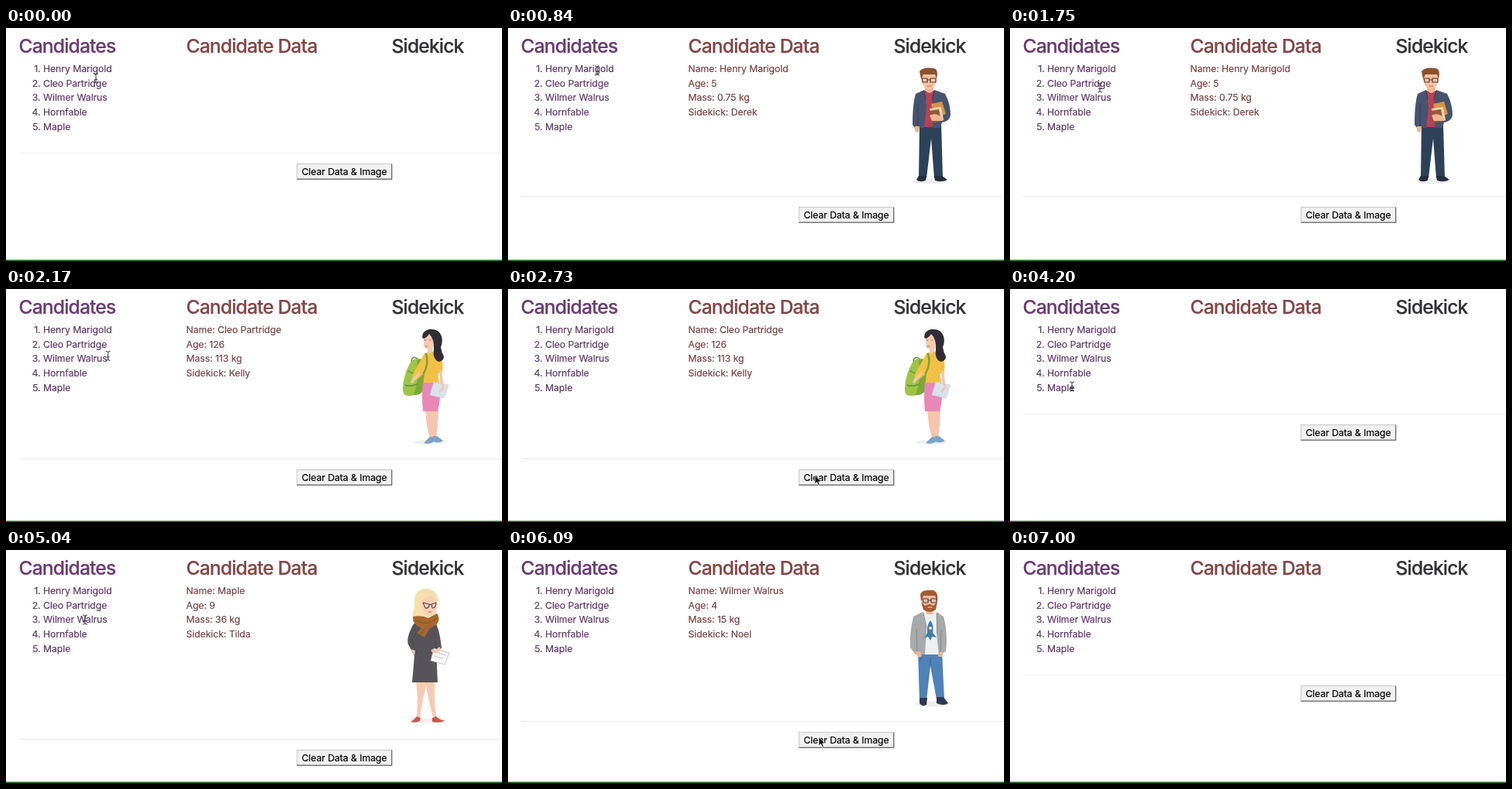
Write an HTML page that moves like this. It is 640 px wide and 301 px high and loops after 7.07 s.

```html
<!DOCTYPE html>
<html lang="en">
<head>
<meta charset="utf-8">
<title>Candidates</title>
<style>
html, body { margin: 0; width: 100%; height: 100%; overflow: hidden; background: #fff; }
svg { display: block; width: 640px; height: 301px; }
text { font: 12.25px Inter, Roboto, sans-serif; letter-spacing: -.07px; stroke: currentColor; stroke-width: .18px; }
.head { font-size: 24.6px; font-weight: 500; letter-spacing: -.83px; stroke-width: .25px; }
.purple { fill: #693c74; color: #693c74; }
.brown { fill: #824746; color: #824746; }
.dark { fill: #323236; color: #323236; }
#list { fill: #5f3669; color: #5f3669; }
#data { fill: #774241; color: #774241; }
.person, #arrow, #beam { display: none; }
.line { fill: none; stroke-linecap: round; stroke-linejoin: round; }
</style>
</head>
<body>
<svg viewBox="0 0 640 301">
  <text class="head purple" x="16.5" y="31.5">Candidates</text>
  <text class="head brown" x="232.5" y="31.5">Candidate Data</text>
  <text class="head dark" x="497.5" y="31.5">Sidekick</text>
  <g id="list"></g>
  <g id="data"></g>

  <g id="p0" class="person">
    <ellipse cx="546" cy="198" rx="22" ry="3.5" fill="#eee"/>
    <path fill="#2d4258" d="M531 124H559L561 194H550L546 143L540 194H530Z"/>
    <path fill="#26303e" d="M530 191H540L539 197Q531 200 527 196ZM550 191H560L567 196Q560 200 551 197Z"/>
    <path fill="#b94057" d="M536 82L543 79L551 82L553 128H533Z"/>
    <path fill="#f3b694" d="M539 73H549V80Q544 88 538 80Z"/>
    <path fill="#47546f" d="M537 80L526 85Q522 98 522 125L525 129H537L540 101ZM550 80L564 85Q571 98 571 113Q569 121 560 122L558 129H548L547 99Z"/>
    <path class="line" stroke="#303c53" stroke-width="1" d="M529 98V126M537 81L539 92M550 81L547 93"/>
    <path fill="#efb48f" d="M525 127H531L530 134Q526 136 525 132Z"/>
    <path fill="#d99544" d="M546 98L560 95L565 111L551 117Z"/>
    <path fill="#f2d9a6" d="M544 104L559 102L562 119L547 122Z"/>
    <path fill="#96583d" d="M543 107L556 105L559 120L546 123Z"/>
    <path fill="#f3b694" d="M544 113Q551 109 558 114L561 120L547 120Z"/>
    <path fill="#f8c29f" d="M533 59H553L552 71Q549 79 543 79Q536 79 534 70Z"/>
    <path fill="#8d512e" d="M533 66L531 56Q535 50 549 52Q556 53 553 66L551 60H536Z"/>
    <path class="line" stroke="#4d3b3a" stroke-width="1.2" d="M534 65H541V70H535ZM545 65H552V70H545ZM541 67H545"/>
    <path class="line" stroke="#b96b59" d="M541 75H546"/>
  </g>

  <g id="p1" class="person">
    <ellipse cx="546" cy="198" rx="20" ry="3" fill="#eef0f0"/>
    <path fill="#f5c5ad" d="M541 156H550L551 178L551 194H547L543 176ZM550 156H558L557 176L555 192H551Z"/>
    <path fill="#7ba4c4" d="M547 191L552 192L551 198Q545 201 539 199ZM551 190H556L564 196Q559 200 551 197Z"/>
    <path fill="#9dc444" d="M523 93Q530 87 540 92L541 120Q538 138 520 138Q511 138 512 128Q513 109 523 93Z"/>
    <path fill="#7ca83a" d="M530 92Q537 89 541 94L540 130Q534 138 526 137Q534 116 530 92Z"/>
    <path class="line" stroke="#648f35" stroke-width="1.4" d="M519 106Q526 111 533 109M515 124Q522 127 530 123M523 93Q524 86 531 90"/>
    <path fill="#f3c046" d="M540 83L549 80L559 84Q565 92 563 107L557 110L560 126H538L540 109L530 117L524 112L534 94Z"/>
    <path class="line" stroke="#78a43a" stroke-width="2.5" d="M542 84Q546 96 539 109"/>
    <path class="line" stroke="#f5c5ad" stroke-width="3.5" d="M527 114L524 120L533 109M561 107L562 121"/>
    <path fill="#e988b8" d="M538 121H560Q562 138 557 158H538Q536 138 538 121Z"/>
    <path fill="#f8cbb3" d="M539 60L546 56L552 62V73L549 82L544 84V77Q539 78 539 71Z"/>
    <path fill="#302e34" d="M537 63Q537 54 546 52Q559 51 562 61Q564 68 561 75Q562 82 565 87Q565 93 558 94Q550 90 552 78Q553 65 546 58Q543 63 539 64Z"/>
    <path class="line" stroke="#80625a" stroke-width=".8" d="M540 66H542M546 66H548M541 74H544"/>
    <path fill="#d8e2ea" stroke="#c5d2dc" stroke-width=".7" d="M552 120L571 124L565 141L547 137Z"/>
    <path class="line" stroke="#f5c5ad" stroke-width="3" d="M562 119L564 127L560 132"/>
  </g>

  <g id="p2" class="person">
    <ellipse cx="545" cy="221" rx="23" ry="3" fill="#f5f0ef"/>
    <path fill="#f6cbb3" d="M529 169H544L538 192L534 218H530L531 191ZM541 169H553V192L555 217H551L545 191Z"/>
    <path fill="#c9574a" d="M530 215L535 217L534 221Q528 224 522 222Q527 219 530 215ZM550 217L555 215Q560 220 566 220Q561 224 550 222Z"/>
    <path fill="#f7dfac" d="M527 62Q530 50 543 50Q555 51 558 64L555 81L560 92H526Q523 83 527 75Z"/>
    <path fill="#56535a" d="M530 91L551 90Q559 97 562 127L555 130L557 171H524L527 137L519 122Q516 114 525 97Z"/>
    <path class="line" stroke="#444249" stroke-width=".8" d="M529 107L524 118L530 133M552 106L555 127"/>
    <path fill="#f6cbb3" d="M523 128L528 130L527 137Z"/>
    <path fill="#f8d0b8" d="M537 62Q543 56 550 59Q557 66 555 76Q552 85 546 85Q538 82 537 73Z"/>
    <path fill="#f7dfac" d="M533 83Q532 70 539 62L550 58L556 66Q557 53 543 51Q529 53 528 80Z"/>
    <path class="line" stroke="#6d3c3c" stroke-width="1.1" d="M538 68L546 70Q546 76 541 75ZM549 70L555 68Q555 75 550 75ZM546 71L549 70"/>
    <path class="line" stroke="#c26459" d="M545 80H549"/>
    <path fill="#a8672f" d="M525 86Q537 84 545 88L556 82Q561 88 556 96L546 102L540 113L530 107L536 101Q524 96 525 86Z"/>
    <path class="line" stroke="#87501f" d="M529 91Q542 99 555 89M540 102L535 109"/>
    <path fill="#f7f7f4" stroke="#b9b5b4" stroke-width=".8" d="M552 127L572 133L566 148L548 143Z"/>
    <path class="line" stroke="#b9b5b4" stroke-width=".8" d="M555 132L567 136M553 137L564 140"/>
    <path class="line" stroke="#f4c7ac" stroke-width="3" d="M559 127L555 132L550 130"/>
  </g>

  <g id="p3" class="person">
    <ellipse cx="547" cy="199" rx="22" ry="3.5" fill="#eee"/>
    <path fill="#4f82b7" d="M529 132H560L563 193H553L545 150L540 194H531Z"/>
    <path class="line" stroke="#366593" d="M545 139V149M534 139L531 143M556 138L560 142"/>
    <path fill="#2d3b50" d="M531 191H541L540 200Q534 203 531 198ZM553 190H562L568 198Q562 202 553 198Z"/>
    <path fill="#edf0f1" d="M535 81L544 79L554 82L557 135H534Z"/>
    <path fill="#a8a9aa" d="M535 80L523 86Q518 107 519 126L526 135H538L540 103ZM553 80L562 86Q568 108 565 131L556 136L553 108Z"/>
    <path class="line" stroke="#848789" d="M527 102L528 132M559 103L558 131M536 81L540 101M553 82L554 108"/>
    <path fill="#f0b493" d="M525 131H532L534 137L529 139ZM555 132H562L560 138H555ZM539 75H550L548 83H540Z"/>
    <path fill="#467ba8" d="M545 91Q550 97 548 107L553 113L547 112L545 117L542 112L537 114L541 107Q540 97 545 91Z"/>
    <circle cx="545" cy="101" r="2" fill="#eef5f7"/>
    <path fill="#f5bd9c" d="M534 57H553V70L548 78H539L534 70Z"/>
    <path fill="#a65b32" d="M533 67L532 58Q533 51 544 52Q556 50 554 67L551 59H536ZM533 67L538 72L544 70L549 72L554 67L552 77Q544 83 536 77Z"/>
    <path class="line" stroke="#4b4547" stroke-width="1.2" d="M535 63H542V68H536ZM546 63H553V68H546ZM542 65H546"/>
    <path class="line" stroke="#edb29a" stroke-width="1.3" d="M542 74H547"/>
  </g>

  <path id="rule" d="M17 .5H640" stroke-width="1"/>
  <g id="button">
    <path fill="#f1f1f1" d="M375 0H498V21H375Z"/>
    <path class="line" stroke="#d2d2d2" stroke-width="1.3" d="M375.5 20V.5H497"/>
    <path class="line" stroke="#777" stroke-width="1.5" d="M376 20.3H497.7V1"/>
    <text x="436.5" y="14.7" text-anchor="middle" style="letter-spacing:-.06px">Clear Data &amp; Image</text>
  </g>
  <path fill="#0d6a14" d="M0 299.4H640V301H0Z"/>

  <path id="arrow" d="M-3-5.5V6L-.4 3.6L1.4 7.6L3.4 6.7L1.7 3L5 2.7Z" fill="#111" stroke="#fff" stroke-width=".8"/>
  <path id="beam" class="line" d="M-2.5-6Q0-6 0-4.5Q0-6 2.5-6M0-4.5V4.5M-2.5 6Q0 6 0 4.5Q0 6 2.5 6M-1.5 1.5H1.5" stroke="#333"/>
</svg>
<script>
const LOOP = 7070, TICK = 70;
const $ = id => document.getElementById(id);
const names = ["Henry Marigold", "Cleo Partridge", "Wilmer Walrus", "Hornfable", "Maple"];
const people = [
  { name: names[0], age: 5, mass: 0.75, mate: "Derek", rule: 217 },
  { name: names[1], age: 126, mass: 113, mate: "Kelly", rule: 219 },
  { name: names[4], age: 9, mass: 36, mate: "Tilda", rule: 244 },
  { name: names[2], age: 4, mass: 15, mate: "Noel", rule: 221 }
];
// Clicks: time and the person shown, -1 for cleared
const clicks = [[0, -1], [420, 0], [1960, 1], [2800, -1], [4340, 2], [5390, 3], [6230, -1]];
// Pointer: time, x, y
const stops = [
  [0, 116, 65], [280, 115, 55], [1400, 115, 55], [1750, 116, 77], [2100, 116, 77],
  [2590, 399, 246], [2800, 399, 246], [3080, 360, 180], [3780, 80, 126], [4690, 80, 126],
  [5040, 102, 90], [5460, 102, 90], [5950, 404, 247], [6300, 404, 247],
  [6650, 416, 286], [6860, 425, 309], [LOOP, 425, 309]
];

const rowY = i => 57.3 + i * 18.55;
const line = (s, x, i, anchor = "start") =>
  `<text x="${x}" y="${rowY(i)}" text-anchor="${anchor}">${s}</text>`;

$("list").innerHTML = names.map((n, i) => line(i + 1 + ".", 44.5, i, "end") + line(n, 48, i)).join("");

let shown;
function show(n) {
  if (n === shown) return;
  shown = n;
  const p = people[n];
  people.forEach((_, i) => $("p" + i).style.display = i === n ? "inline" : "none");
  $("data").innerHTML = p ? [`Name: ${p.name}`, `Age: ${p.age}`, `Mass: ${p.mass} kg`, `Sidekick: ${p.mate}`]
    .map((s, i) => line(s, 232.5, i)).join("") : "";
  const y = p ? p.rule : 161;
  $("rule").setAttribute("transform", `translate(0 ${y})`);
  $("rule").setAttribute("stroke", p ? "#e8e8e8" : "#efefef");
  $("button").setAttribute("transform", `translate(0 ${y + 14})`);
}

function movePointer(t) {
  const i = stops.findIndex(s => s[0] > t);
  const [t0, x0, y0] = stops[i - 1], [t1, x1, y1] = stops[i];
  const u = (t - t0) / (t1 - t0), e = u * u * (3 - 2 * u);
  const x = x0 + (x1 - x0) * e, y = y0 + (y1 - y0) * e;
  const overText = x < 140 && y > 45 && y < 136;
  for (const [id, on] of [["beam", overText], ["arrow", !overText]]) {
    $(id).style.display = on ? "inline" : "none";
    $(id).setAttribute("transform", `translate(${x} ${y})`);
  }
}

function draw() {
  const t = Math.floor(performance.now() % LOOP / TICK) * TICK;
  show(clicks.filter(c => c[0] <= t).pop()[1]);
  movePointer(t);
  requestAnimationFrame(draw);
}
draw();
</script>
</body>
</html>
```
